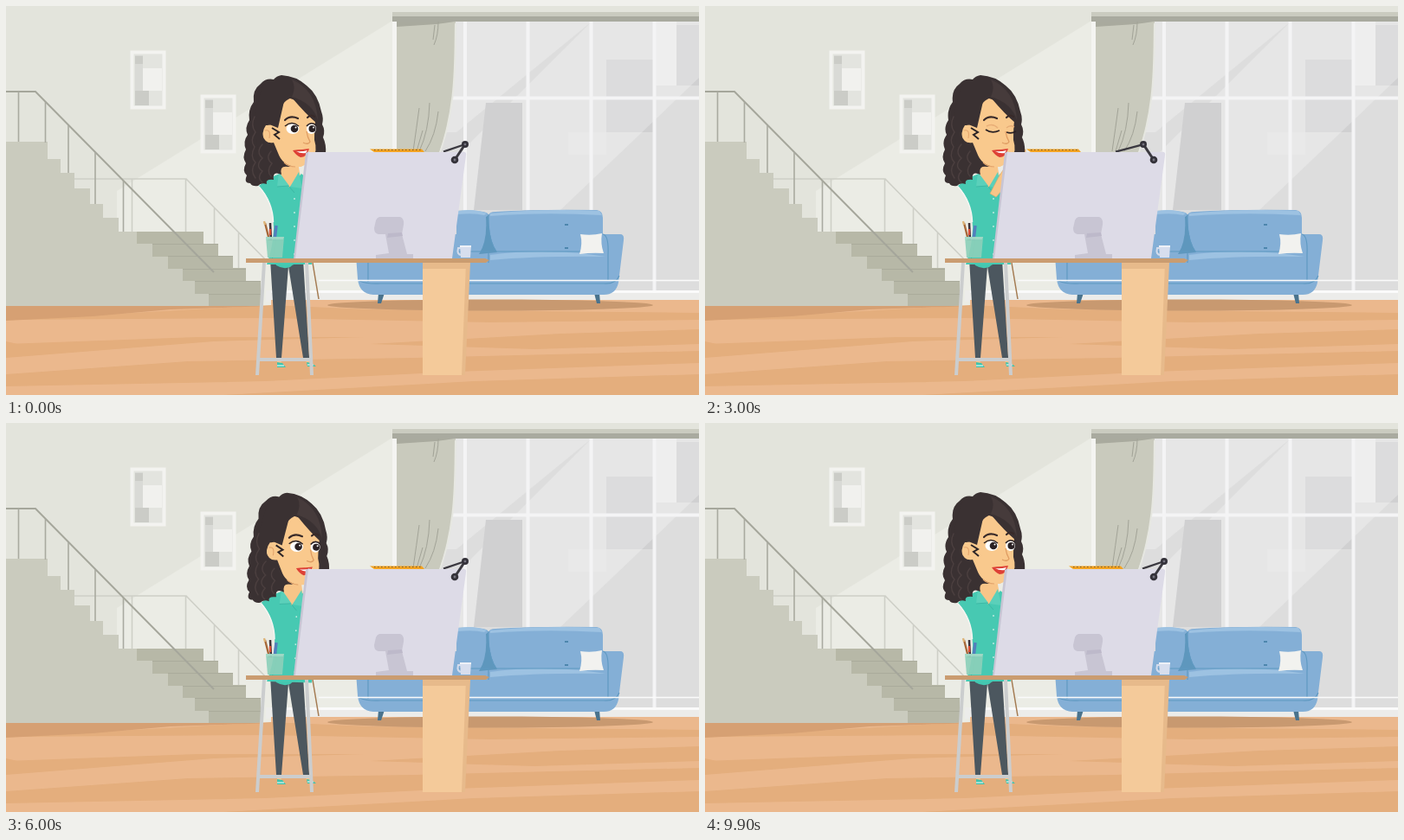
An HTML page that plays this animation: 800x450 px, repeating every 10 s.

```html
<!DOCTYPE html>
<html lang="en">
<head>
<meta charset="utf-8">
<title>Designer at her desk</title>
<style>
html, body { margin: 0; width: 100%; height: 100%; overflow: hidden; }
svg { display: block; width: 800px; height: 450px; }
</style>
</head>
<body>
<svg viewBox="0 0 800 450">
  <defs>
    <clipPath id="pane"><path d="M451 18H800V331H451Z"/></clipPath>
    <g id="picture">
      <rect x="2.5" y="2.5" width="37" height="64" fill="#e3e4df" stroke="#f3f3f0" stroke-width="4"/>
      <path fill="#d9dad6" d="M6 6h9v58h-9z"/>
      <path fill="#f1f1ee" d="M15 21h22v26h-22z"/>
      <path fill="#cbccc7" d="M6 7h9v9h-9zM6 47h16v17h-16z"/>
    </g>
  </defs>

  <!-- Wall -->
  <rect width="800" height="450" fill="#e3e4dc"/>
  <path fill="#ebece5" d="M451 14L128 214V347H451Z"/>
  <use href="#picture" x="143" y="51"/>
  <use href="#picture" x="224" y="102"/>

  <!-- Window -->
  <g clip-path="url(#pane)">
    <path fill="#dddddd" d="M451 18H800V331H451Z"/>
    <path fill="#e6e6e6" d="M500 18H676L520 146H500Z"/>
    <path fill="#d0d0d1" d="M693 62H747V146H693ZM774 22H800V92H774Z"/>
    <path fill="#e8e8e8" d="M749 18H774V92H749Z"/>
    <path fill="#fff" opacity=".25" d="M676 18H800V83L640 236H490V204Z"/>
    <path fill="#d0d0d1" d="M554 112H596V236H540Z"/>
    <path fill="#e9e9e9" d="M649 146H693V172H649Z"/>
    <path fill="none" stroke="#f4f4f5" stroke-width="4" d="M530 18V331M602.5 18V331M675.5 18V331M748.5 18V331M500 106.5H800"/>
  </g>
  <path fill="#ececea" d="M300 329H800V342H300Z"/>
  <path stroke="#fafafa" stroke-width="3" d="M306 330.5H800"/>
  <path fill="#c9cabd" d="M451 18H519C518 62 521 120 496 180L485 230H451Z"/>
  <path fill="#a9aa9e" d="M451 18H518L497 21L451 24Z"/>
  <path fill="none" stroke="#e6e7e1" stroke-width="2" d="M519 20C518 62 521 120 497 180"/>
  <path fill="none" stroke="#a2a397" d="M499 18Q499 34 494 45M495 22L493 39M477 118Q474 140 470 168M489 112Q488 145 477 168M499 122Q496 150 484 168M481 144L474 168"/>
  <path fill="#f4f4f1" d="M446 18H451V331H446Z"/>
  <path fill="#cacbc0" d="M446 7H800V13H446Z"/>
  <path fill="#a9aa9f" d="M446 12H800V18H446Z"/>

  <!-- Stairs -->
  <path fill="#cacbbe" d="M0 157H48V177H63V193H79V211H97V229H112V245H130V261H152V275H235V347H0Z"/>
  <path fill="#b7b8a7" d="M151 261H228V275H245V289H262V303H277V319H294V347H234V333H218V318H204V304H187V290H169V275H151Z"/>
  <path stroke="#aaab9b" d="M169 275.5H245M187 289.5H262M204 304.5H277M218 318.5H294M234 333.5H294"/>
  <path fill="none" stroke="#cecfc7" stroke-width="1.6" d="M79 200H208L302 296M145.500 200V261M207.500 200V261M240.500 233V275M268.500 262V303"/>
  <path fill="none" stroke="#a5a69b" stroke-width="2" d="M0 99H34L240 308"/>
  <path fill="none" stroke="#a9aaa0" stroke-width="1.6" d="M14.500 99V157M45.500 111V158M72 138V193M103 169V229M135.500 202V261"/>

  <!-- Floor -->
  <path fill="#ebb88d" d="M0 347H306V340H800V450H0Z"/>
  <g fill="#e4ae7d">
    <path d="M0 363L200 352L306 346L420 351L800 355V363L560 366L300 361ZM0 388L46 398L0 396Z"/>
    <path d="M0 391L220 383L414 383L240 388L0 407ZM420 391L640 379L800 374V391L610 397Z"/>
    <path d="M0 426L210 411L470 407L800 399V413L520 423L300 434L0 440ZM250 450L540 434L800 426V450Z"/>
  </g>
  <path fill="#d6a073" d="M0 347H306L190 351L100 359L0 364Z"/>

  <!-- Sofa -->
  <ellipse cx="559" cy="346" rx="188" ry="6.500" fill="#c89970"/>
  <path fill="#49738d" d="M430 332H437L433 344H429ZM679 332H685L686 344H682Z"/>
  <path fill="#84afd6" d="M414 264H520V238Q535 235 551 238Q557 239 557 242Q558 238 565 238Q610 235 682 236Q689 237 689 245V264H709Q714 264 713 271L707 320Q704 334 690 334H424Q408 333 406 316L403 275Q403 264 414 264Z"/>
  <path fill="#9dc2e2" d="M521 237Q542 234 555 240L552 242Q540 239 521 241ZM559 240Q620 234 685 237L688 242Q620 238 559 243ZM559 288Q606 281 665 286L692 290Q614 289 559 294Z"/>
  <path fill="#5e97bd" d="M554 244Q556 272 546 287L567 285Q557 271 557 242Z"/>
  <path fill="none" stroke="#5f99c1" stroke-width="1.2" d="M557 241Q556 270 566 284H665M689 264Q696 265 695 288V317M522 284H557V297M408 318Q418 322 432 321H690Q704 322 708 312M418 297V319"/>
  <path fill="none" stroke="#4d86ad" stroke-width="2" d="M645 253h4M645 280h4"/>
  <path fill="#f2f2ef" d="M663 264Q676 266 688 263Q686 275 690 286Q676 285 662 287Q666 275 663 264Z"/>
  <path stroke="#fafafa" stroke-width="1.3" d="M361 317.500H800"/>

  <!-- Legs -->
  <path fill="#4c575f" d="M305 293H343L350 407H343L326 301L318 407H312Z"/>
  <path fill="#f8c58a" d="M313 407h4l1 6h-5zM345 407h4l2 6h-4z"/>
  <path fill="#3fc4ae" d="M313 412l6 1l4 5h-10zM347 412l6 1l5 4h-10z"/>
  <path stroke="#fff" d="M313 416h8M348 415h7"/>
  <path fill="#43c7b0" d="M307 290H342V298Q334 296 328 302Q320 305 312 300Z"/>

  <!-- Upper body -->
  <g id="upper">
    <path fill="#f8c588" d="M318 176L337 181L342 210L327 218L314 203Z"/>
    <path fill="#47c9b2" d="M292 208Q302 199 316 194L327 210L341 194L353 204V299H301Q308 280 309 258C309 234 302 219 292 208Z"/>
    <path fill="none" stroke="#f4f6f2" stroke-width="1.5" d="M292 209C301 219 308 232 308.500 250"/>
    <path fill="#5bd0ba" d="M315 192L313 209L327 208ZM338 192L342 211L328 209Z"/>
    <path fill="none" stroke="#39b3a0" stroke-width=".8" d="M313 209L326 208L333 216M310 259Q314 276 307 293"/>
    <path fill="none" stroke="#c9eee3" stroke-width="1.800" stroke-linecap="round" stroke-dasharray="0 16" d="M333 223V291"/>
    <g id="hand" fill="#f8c588" stroke="#e2a667" stroke-width=".6">
      <path d="M329 217L340 196Q344 188 351 184V204L336 221Z"/>
      <path id="fingers" d="M347 169L352 162Q359 163 370 166V172H347Z"/>
    </g>

    <path fill="#3a3132" d="M318 80Q335 81 347 92Q360 102 364 122Q367 130 365 137Q369 144 366 152Q370 160 369 171L350 177L326 186Q315 184 318 195Q307 190 309 201Q299 200 301 206Q294 204 291 208Q284 209 282 205Q274 205 278 196Q272 191 277 182Q272 175 277 166Q273 157 279 149Q275 141 281 132Q279 120 286 111Q284 97 294 90Q300 83 309 85Q312 81 318 80Z"/>
    <path fill="#f9c98d" d="M322 106Q344 108 357 133Q356 142 356 155Q360 168 354 175Q346 188 333 186Q319 184 314 170L309 158Q299 160 296 149Q294 137 304 137L314 141Z"/>
    <path fill="none" stroke="#e3a56c" stroke-width="1.100" d="M299 144Q306 142 304 153M321 181Q326 186 334 186"/>
    <path fill="#3a3132" d="M296 92Q310 81 333 84Q355 94 362 117L364 149Q360 139 358 135Q347 126 330 106Q316 111 315 128Q308 139 300 138Q294 146 298 158L291 169L286 130Z"/>
    <path fill="#463b3b" d="M330 85Q358 97 360 132Q354 112 330 105Q335 94 330 85Z"/>
    <path fill="none" stroke="#2b2426" stroke-width="2" d="M307 141L315 146L310 149L316 154"/>
    <path fill="none" stroke="#4b3f3f" stroke-width="1.400" stroke-linecap="round" d="M287 128Q282 138 288 146Q281 156 287 163Q281 174 288 181Q281 190 288 199M296 160Q288 169 296 176Q287 185 296 191Q289 199 296 204M306 168Q299 176 307 182Q300 191 306 197"/>

    <path fill="none" stroke="#382a29" stroke-width="2.200" stroke-linecap="round" d="M322 132Q328 126 337 130M348 129Q352 125 356 128"/>
    <g id="eyes">
      <ellipse cx="331" cy="142" rx="7.500" ry="6" fill="#fff"/>
      <ellipse cx="352.500" cy="142" rx="5.500" ry="6" fill="#fff"/>
      <path fill="none" stroke="#2b2224" stroke-width="1.500" d="M322 139Q330 132 338 139M347 139Q352 133 358 138"/>
      <g fill="#2b2224"><circle cx="333" cy="142" r="4.300"/><circle cx="353.500" cy="142" r="4"/></g>
      <g fill="#fff"><circle cx="334.500" cy="140.500" r="1"/><circle cx="355" cy="140.500" r="1"/></g>
    </g>
    <g id="lids" fill="none" stroke="#2b2224" stroke-width="1.700">
      <path stroke="#e8ae77" stroke-width="1.500" d="M325 139Q332 135 338 141M348 141Q352 137 357 140"/>
      <path d="M324 143Q331 148 340 144M348 146Q354 148 359 145"/>
    </g>
    <path fill="none" stroke="#df9c62" stroke-width="1.300" d="M347 145Q348 152 351 157Q349 161 343 158"/>
    <path fill="#dd4036" d="M331 167Q337 166 342 166L350 165Q347 175 340 175Q335 173 331 167Z"/>
    <path fill="#fff" d="M335 168Q341 169 348 167L346 170Q340 171 335 168Z"/>
  </g>

  <!-- Drawing rig and screen -->
  <g id="ruler">
    <path fill="#f3a321" d="M420 165.500H480L483 169H425Z"/>
    <path stroke="#785521" stroke-width="1" stroke-dasharray="1.500 2.500" d="M425 166.500H479"/>
  </g>
  <path id="rod" fill="none" stroke="#3b3940" stroke-width="2.300"/>
  <path fill="#c8c5d4" d="M346 170L350 168L336 292H332Z"/>
  <path fill="#dddbe7" d="M349 169H527Q532 168 531 173L515 292H334Z"/>
  <path fill="#c8c5d3" d="M431 244H455Q460 246 459 253L457 264L463 287H470V292H427V288L442 286L438 264H430Q425 263 425 257L427 248Q428 245 431 244Z"/>
  <path fill="#bdb9ca" d="M441 263L457 262L458 266L440 268Z"/>
  <g fill="#34323a">
    <path id="arm" fill="none" stroke="#3b3940" stroke-width="3"/>
    <circle id="joint" r="4"/><circle cx="518" cy="178" r="4.300"/>
  </g>
  <g fill="#777581"><circle id="pin" r="1.400"/><circle cx="518" cy="178" r="1.400"/></g>

  <!-- Desk -->
  <path stroke="#a47b52" stroke-width="1.500" d="M354 297L361 339"/>
  <path fill="none" stroke="#cbcdce" stroke-width="4" d="M298 297L290 427M347 297L353 427M291 409H352"/>
  <path fill="#f4ca9a" d="M481 297H535L527 427H481Z"/>
  <path fill="#e7ba8b" d="M531 297H536L530 427H526ZM481 297H535L534 304H481Z"/>
  <path fill="#ca9c70" d="M277 292H553L558 294L554 297H277Z"/>
  <g fill="none" stroke-width="2.300">
    <path stroke="#a66838" d="M299 251L304 271"/>
    <path stroke="#ddb477" d="M298 249L299 253"/>
    <path stroke="#40333a" stroke-width="2.500" d="M305 251L306 271"/>
    <path stroke="#d94e38" d="M305 258V265"/>
    <path stroke="#527fbc" stroke-width="3.500" d="M312 254L310 271"/>
  </g>
  <path fill="#8ccfba" opacity=".92" d="M300 267H321L319 291H302Z"/>
  <path fill="#a9dbca" opacity=".7" d="M300 267H321L320 270H300Z"/>
  <path fill="none" stroke="#d4dcec" stroke-width="2" d="M526 280H522Q520 288 526 288"/>
  <path fill="#d7deee" d="M524 277H537L536 291H525Z"/>
  <path fill="#eef1f7" d="M524 277H537V279H524Z"/>
</svg>
<script>
const LOOP = 10000, CYCLE = 5000;
const el = Object.fromEntries([...document.querySelectorAll("svg [id]")].map(n => [n.id, n]));

// Alternating time and value pairs, eased between neighbours
const leanKeys = [0, 0, 500, 0, 1100, .2, 1800, .7, 2200, 1, 2700, 0, 5000, 0];
const slideKeys = [0, 0, 2250, 0, 2800, 1, 3500, 1, 4400, 0, 5000, 0];
const handKeys = [0, 55, 2300, 55, 2800, 0, 3000, 0, 3200, 16, 3500, 20, 4300, 55, 5000, 55];

function track(keys, t) {
  let i = 0;
  while (i < keys.length - 4 && t >= keys[i + 2]) i += 2;
  const p = Math.min(1, Math.max(0, (t - keys[i]) / (keys[i + 2] - keys[i])));
  return keys[i + 1] + (keys[i + 3] - keys[i + 1]) * p * p * (3 - 2 * p);
}

function show(node, visible) {
  node.setAttribute("visibility", visible ? "visible" : "hidden");
}

function moveRig(slide) {
  const swing = .588 * (1 - 2 * slide);
  const x = 518 + 21.6 * Math.sin(swing);
  const y = 178 - 21.6 * Math.cos(swing);
  const reach = 25 + 7 * slide;
  el.ruler.setAttribute("transform", `translate(${-49 * slide})`);
  el.rod.setAttribute("d", `M${x} ${y}L${x - reach} ${y + 8.5}`);
  el.arm.setAttribute("d", `M${x} ${y}L518 178`);
  for (const node of [el.joint, el.pin]) {
    node.setAttribute("cx", x);
    node.setAttribute("cy", y);
  }
}

function render(time) {
  const t = time % CYCLE;
  const lean = track(leanKeys, t);
  const drop = track(handKeys, t);
  el.upper.setAttribute("transform", `translate(0 ${3.8 * lean}) rotate(${9 * lean} 322 300)`);
  el.hand.setAttribute("transform", `translate(${drop * .3} ${drop})`);
  show(el.hand, drop < 50);
  show(el.fingers, drop < 8);
  const blink = time >= 2950 && time < 3150;
  show(el.eyes, !blink);
  show(el.lids, blink);
  moveRig(track(slideKeys, t));
}

const start = performance.now();
function frame() {
  render((performance.now() - start) % LOOP);
  requestAnimationFrame(frame);
}
frame();
</script>
</body>
</html>
```
